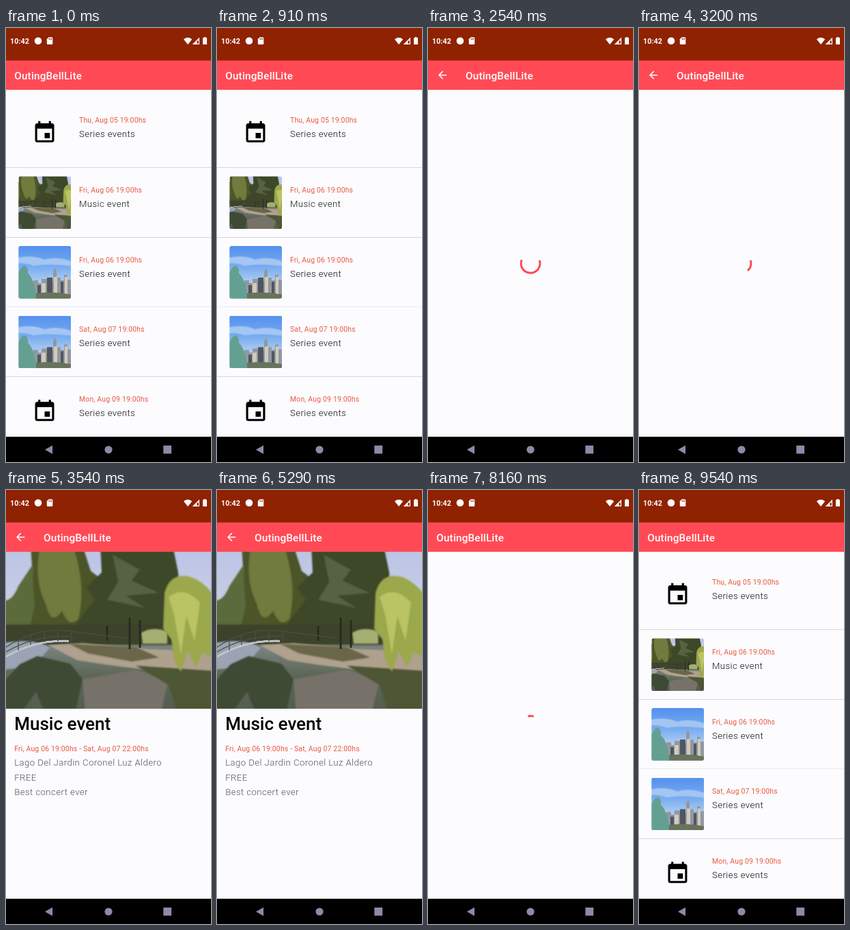
These frames come from a looping animation (300x633 px, 9580 ms). An HTML page with a canvas:

```html
<!DOCTYPE html>
<html lang="en">
<head>
<meta charset="utf-8">
<title>Event list</title>
<style>
  html, body { margin: 0; width: 100%; height: 100%; overflow: hidden; background: #fcfcff; }
  canvas { display: block; width: 300px; height: 633px; }
</style>
</head>
<body>
<canvas id="stage"></canvas>
<script>
const W = 300, H = 633, LOOP = 9580;
const OPEN = 2203, LOADED = 3400, BACK = 5735, LISTED = 8400;
const RED = '#ff4a56', ORANGE = '#e9573f', PAPER = '#fcfcff';
const APP = 'OutingBellLite';

const canvas = document.getElementById('stage');
const dpr = window.devicePixelRatio || 1;
canvas.width = W * dpr;
canvas.height = H * dpr;
let c = canvas.getContext('2d');

const calendarIcon = new Path2D('M17 12h-5v5h5zM16 1v2H8V1H6v2H5c-1.1 0-2 .9-2 2v14c0 1.1.9 2 2 2h14c1.1 0 2-.9 2-2V5c0-1.1-.9-2-2-2h-1V1zM19 19H5V8h14z');
const arrowIcon = new Path2D('M20 11H7.83l5.59-5.59L12 4l-8 8 8 8 1.41-1.41L7.83 13H20z');

function rect(color, x, y, w, h) {
  c.fillStyle = color;
  c.fillRect(x, y, w, h);
}

function shape(color, d) {
  c.fillStyle = color;
  c.fill(new Path2D(d), 'evenodd');
}

function line(color, width, d) {
  c.strokeStyle = color;
  c.lineWidth = width;
  c.stroke(new Path2D(d));
}

function disc(color, x, y, r) {
  c.fillStyle = color;
  c.beginPath();
  c.arc(x, y, r, 0, 7);
  c.fill();
}

function text(str, x, y, size, color, weight = 400, spacing = 0) {
  c.font = `${weight} ${size}px Roboto, sans-serif`;
  c.letterSpacing = spacing + 'px';
  c.fillStyle = color;
  c.fillText(str, x, y);
}

const dateText = (str, x, y) => text(str, x, y, 10.4, ORANGE, 400, 0.2);
const bodyText = (str, x, y, color) => text(str, x, y, 13.2, color, 300, 0.42);

function icon(path, x, y, scale, color) {
  c.save();
  c.translate(x, y);
  c.scale(scale, scale);
  c.fillStyle = color;
  c.fill(path, 'evenodd');
  c.restore();
}

function fade(y0, y1, ...colors) {
  const g = c.createLinearGradient(0, y0, 0, y1);
  colors.forEach((col, i) => g.addColorStop(i / (colors.length - 1), col));
  return g;
}

// Lake view, 300 by 229
function park() {
  rect(fade(0, 140, '#bcc5e6', '#d2d5e4'), 0, 0, 300, 140);
  rect(fade(134, 229, '#7d8684', '#5d6757', '#555d50'), 0, 136, 300, 93);
  c.filter = 'blur(2px)';
  shape('#5c6b3c', 'M-9 70Q8 76 18 50L38 20 60 130H-9z');
  shape('#4b5528', 'M36 -9H112L124 28 140 40V130H30L42 80z');
  shape('#717b3e', 'M50 -9H98Q118 50 106 98Q92 112 82 86Q66 110 58 76Q40 40 50 -9z');
  shape('#3d4829', 'M138 -9H244L252 30 258 134H112L104 104 130 70 118 52 140 30z');
  shape('#566241', 'M156 4L196 26 184 42 224 60 176 64 204 82 148 70 164 44z');
  rect('#3c432b', -9, 106, 320, 30);
  shape('#a5af72', 'M198 118Q214 108 236 116V134H200z');
  shape('#9ba4b4', 'M-9 134Q40 124 64 140L40 168 -9 172z');
  shape('#b0a18e', 'M62 136L112 133 210 142 309 145V180L222 174 150 165 104 158z');
  shape('#6a6649', 'M92 134L190 139 224 154 184 160 120 148z');
  shape('#3f4a34', 'M20 164L46 152 94 163 112 186 100 238H58L44 204 20 238H-9V196z');
  shape('#777269', 'M112 186L190 172 238 186 226 238H116z');
  shape('#4d5635', 'M190 166L309 174V238H252L238 194z');
  shape('#9ca84c', 'M232 60Q240 30 268 36Q290 42 309 70V158L288 146 278 168 266 144 256 175 246 158 242 128 230 112z');
  shape('#bbc464', 'M238 66Q260 48 284 74L276 130 264 94 256 150 246 92z');
  c.filter = 'none';
  line('#292c1d', 3, 'M181 96V142M196 100V140M148 108V130');
  line('#c1c4cc', 3, 'M0 153Q42 128 92 130');
  line('#465047', 1.3, 'M0 139Q44 110 90 115L176 126M0 146Q42 121 96 123M18 130V144M36 122V136M56 117V132M76 115V131M96 116V130');
}

// Skyline view, 77 by 77
function city() {
  rect(fade(0, 58, '#5591ee', '#76aaf0', '#bcd6f2'), 0, 0, 77, 77);
  c.filter = 'blur(1.5px)';
  shape('#a4c6f2', 'M-5 18Q20 12 38 20Q58 14 82 24V30Q45 25 22 29Q10 24 -5 26z');
  c.filter = 'none';
  shape('#9198a0', 'M14 77V56H22V50H29V54H34V48H42V51H51V37L53.5 32 56 37V46H62V50H67V42H72V49H77V77z');
  shape('#50565f', 'M42 46H50V77H42zM62 52H66V77H62zM28 57H33V77H28z');
  shape('#d3cabc', 'M34 54H40V77H34zM52 45H57V77H52zM68 45H72V77H68z');
  shape('#68735d', 'M20 70Q48 65 77 71V77H20z');
  shape('#64a092', 'M0 77V39Q4 29 9 29Q14 30 14 40Q24 49 26 77z');
}

// Paint a picture once, for use at any size
function render(paint, w, h) {
  const page = c;
  const pic = document.createElement('canvas');
  pic.width = w * 2;
  pic.height = h * 2;
  c = pic.getContext('2d');
  c.scale(2, 2);
  paint();
  c = page;
  return pic;
}

const parkPic = render(park, 300, 229);
const cityPic = render(city, 77, 77);

const rows = [
  ['Thu, Aug 05 19:00hs', 'Series events', null],
  ['Fri, Aug 06 19:00hs', 'Music event', parkPic],
  ['Fri, Aug 06 19:00hs', 'Series event', cityPic],
  ['Sat, Aug 07 19:00hs', 'Series event', cityPic],
  ['Mon, Aug 09 19:00hs', 'Series events', null]
];

// Square thumbnail from the middle of a picture
function thumb(pic, x, y, size) {
  const side = pic.height;
  c.save();
  c.beginPath();
  c.roundRect(x, y, size, size, 3);
  c.clip();
  c.drawImage(pic, (pic.width - side) / 2, 0, side, side, x, y, size, size);
  c.restore();
}

function statusBar() {
  rect('#8f2200', 0, 0, W, 48);
  text('10:42', 6, 23, 10.8, '#fff', 700);
  disc('#fff', 47, 18.8, 5.3);
  shape('#fff', 'M62.5 13.5H67Q68.3 13.5 68.3 14.8V22.8Q68.3 24 67 24H61Q59.8 24 59.8 22.8V16.3z');
  line('#8f2200', 0.9, 'M63 15V17.2M64.8 15V17.2M66.6 15V17.2');
  shape('#fff', 'M260 16.4Q266 11.5 272.2 16.4L266.1 24z');
  shape('#fff', 'M283 13.7V24H272.7zM281.8 18.5H279.5V22.8H281.8z');
  shape('#fff', 'M289.6 14.2V13.2H292.4V14.2H294V24H288V14.2z');
}

function appBar(back) {
  rect(RED, 0, 47.4, W, 42.8);
  if (back) icon(arrowIcon, 12, 59.5, 0.764, '#fff');
  text(APP, back ? 55 : 12.2, 75, 15.28, '#fff', 500, 0.19);
}

function navBar() {
  rect('#000', 0, 596.2, W, 36.8);
  shape('#8f89a8', 'M57 615L68 608.8V621.2z');
  disc('#8f89a8', 150, 615, 5.6);
  rect('#8f89a8', 230.3, 609, 11.8, 11.8);
}

function list() {
  rows.forEach(([date, name, pic], i) => {
    const y = i * 101.6;
    if (pic) thumb(pic, 18.3, 114.8 + y, 76.8);
    else icon(calendarIcon, 37.9, 134.3 + y, 1.55, '#000');
    dateText(date, 107, 138.4 + y);
    bodyText(name, 107, 159.4 + y, '#101014');
    if (i < 4) rect(i === 2 ? '#ebebf2' : '#d6d6de', 0, 203 + Math.round(y), W, 1);
  });
}

function detail() {
  c.drawImage(parkPic, 0, 90.2, 300, 229);
  text('Music event', 12.2, 350.3, 26, '#000', 500);
  dateText('Fri, Aug 06 19:00hs - Sat, Aug 07 22:00hs', 12.2, 381.4);
  bodyText('Lago Del Jardin Coronel Luz Aldero', 12.2, 402, '#55555a');
  bodyText('FREE', 12.2, 423.8, '#55555a');
  bodyText('Best concert ever', 12.2, 445.4, '#55555a');
}

// Value at x of a cubic from (0,0) to (ex,ey)
function cubic(x, x1, y1, x2, y2, ex, ey) {
  const at = (s, a, b, e) => 3 * s * (1 - s) ** 2 * a + 3 * s * s * (1 - s) * b + s ** 3 * e;
  let lo = 0, hi = 1;
  for (let i = 0; i < 24; i++) {
    const mid = (lo + hi) / 2;
    if (at(mid, x1, x2, ex) < x) lo = mid; else hi = mid;
  }
  return at(lo, y1, y2, ey);
}

// The tail waits half a cycle, then catches up with the head
function spinner(ms) {
  const p = ms / 1333 % 1;
  const tail = p < 0.5 ? 0 : cubic(p - 0.5, 0.2, 0, 0.1, 1, 0.5, 1);
  const head = p < 0.5 ? cubic(p, 0.2, 0, 0.1, 1, 0.5, 0.96) : 0.92 + 0.08 * p;
  const turn = p / 4 + ms * 2 / 4444 - 0.25;
  const angle = v => (turn + v * 0.75) * Math.PI * 2;
  c.strokeStyle = RED;
  c.lineWidth = 3;
  c.lineCap = 'square';
  c.beginPath();
  c.arc(150, 343.4, 13.9, angle(tail), angle(Math.max(head, tail + 0.004)));
  c.stroke();
  c.lineCap = 'butt';
}

function draw(t) {
  c.setTransform(dpr, 0, 0, dpr, 0, 0);
  rect(PAPER, 0, 0, W, H);
  if (t < OPEN || t >= LISTED) list();
  else if (t < LOADED) spinner(t - OPEN);
  else if (t < BACK) detail();
  else spinner(t - BACK);
  statusBar();
  appBar(t >= OPEN && t < BACK);
  navBar();
}

const start = performance.now();
function tick() {
  draw((performance.now() - start) % LOOP);
  requestAnimationFrame(tick);
}
tick();
</script>
</body>
</html>
```
